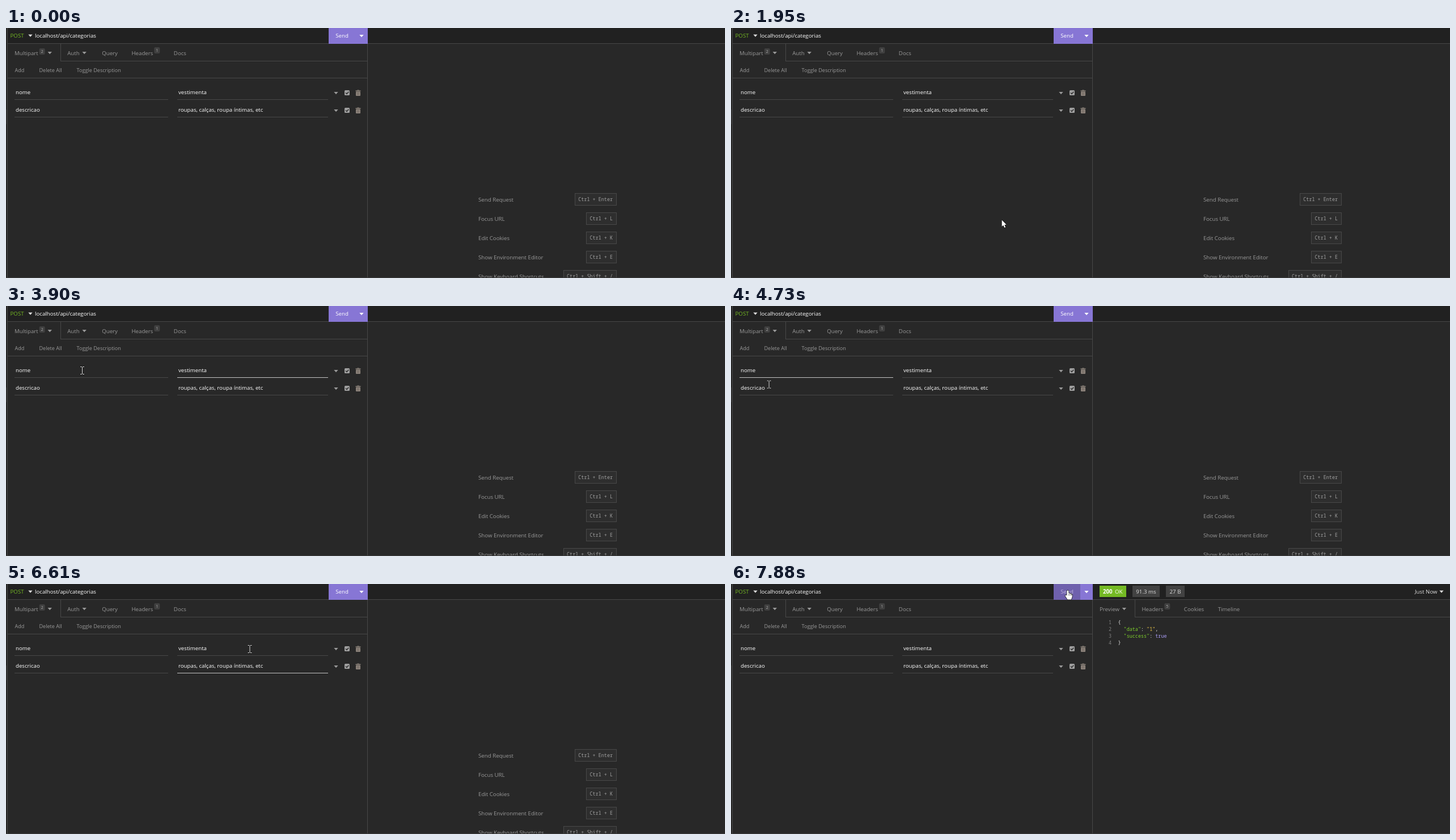
Recreate the animation shown at these times as an HTML page with a canvas. Size 1268x442 px, loop 8 s.

```html
<!DOCTYPE html>
<html lang="pt">
<head>
<meta charset="utf-8">
<title>API client</title>
<style>
html, body { margin: 0; width: 100%; height: 100%; overflow: hidden; background: #282828; }
canvas { display: block; }
</style>
</head>
<body>
<canvas id="stage" width="1268" height="442"></canvas>
<script>
const ctx = document.getElementById('stage').getContext('2d');
const LOOP = 8000, RESPONSE_AT = 7700, CLICK_DELAY = 150, BLINK = 500;
const SANS = '"Open Sans", "Noto Sans", sans-serif';
const MONO = '"Noto Sans Mono", "DejaVu Sans Mono", monospace';
const UI = `9.7px ${SANS}`, SMALL = `9.1px ${SANS}`, KEYS = `8.45px ${MONO}`, CODE = `500 ${KEYS}`;
const BG = '#282828', BAR = '#212121', LINE = '#484848', GREY = '#999', WHITE = '#fff';
const GREEN = '#75ba24', PURPLE = '#8776d5', PALE = '#ddd';

const ROW_TOP = 126, ROW_STEP = 31;
const COLUMNS = [{ x: 15, right: 286 }, { x: 302, right: 568 }];
const FIELDS = ['nome', 'vestimenta', 'descricao', 'roupas, calças, roupa íntimas, etc']
  .map((value, i) => ({ value, ...COLUMNS[i % 2], y: ROW_TOP + ROW_STEP * (i >> 1) }));

// The pointer glides from stop to stop; a stop may click a field, or Send.
const ENTRY = { x: 606, y: 432 };
const STOPS = [
  { leave: 290, arrive: 750, x: 466, y: 293 },
  { leave: 1040, arrive: 1200, x: 552, y: 234 },
  { leave: 1300, arrive: 1450, x: 658, y: 460 },
  { leave: 1450, arrive: 1600, x: 549, y: 450 },
  { leave: 1600, arrive: 2410, x: 371, y: 174 },
  { leave: 2450, arrive: 2780, x: 350, y: 110, click: 'vestimenta' },
  { leave: 3320, arrive: 3900, x: 134.5, y: 114 },
  { leave: 3980, arrive: 4020, x: 47, y: 115, click: 'nome' },
  { leave: 4400, arrive: 4910, x: 75, y: 148, click: 'descricao' },
  { leave: 5060, arrive: 5550, x: 416, y: 147, click: FIELDS[3].value },
  { leave: 5890, arrive: 6530, x: 430, y: 115, click: 'vestimenta' },
  { leave: 6720, arrive: 7480, x: 594, y: 11, click: 'Send' }
];

const SHORTCUTS = {
  'Send Request': 'Ctrl + Enter',
  'Focus URL': 'Ctrl + L',
  'Edit Cookies': 'Ctrl + K',
  'Show Environment Editor': 'Ctrl + E',
  'Show Keyboard Shortcuts': 'Ctrl + Shift + /'
};

const JSON_LINES = ['{', '  "data": "1",', '  "success": true', '}'];

const smooth = k => k * k * (3 - 2 * k);

function rect(x, y, w, h, color) {
  ctx.fillStyle = color;
  ctx.fillRect(x, y, w, h);
}

function round(x, y, w, h, r, color) {
  ctx.fillStyle = color;
  ctx.beginPath();
  ctx.roundRect(x, y, w, h, r);
  ctx.fill();
}

// Draws text and returns its width.
function text(str, x, y, color = GREY, font = UI, align = 'left') {
  ctx.font = font;
  ctx.fillStyle = color;
  ctx.textAlign = align;
  ctx.fillText(str, x, y);
  return ctx.measureText(str).width;
}

function caretDown(x, y, color = GREY) {
  ctx.fillStyle = color;
  ctx.beginPath();
  ctx.moveTo(x - 3.7, y - 2);
  ctx.lineTo(x + 3.7, y - 2);
  ctx.lineTo(x, y + 2.2);
  ctx.fill();
}

// Lays tabs out from left to right, with a divider after the first.
function drawTabs(x, right, tabs) {
  tabs.forEach(({ label, count, menu }, i) => {
    x += text(label, x, 47.5);
    if (count) {
      const y = menu ? 36 : 34;
      round(x + 2, y, 10, 11, 2, '#404040');
      text(count, x + 7, y + 8.3, '#aaa', `7px ${SANS}`, 'center');
      x += 12;
    }
    if (menu) {
      caretDown(x + 8.5, 44);
      x += 15;
    }
    x += 24.5;
    if (i === 0) {
      const edge = Math.round(x - 12.5);
      rect(edge, 28, 1, 31, LINE);
      rect(edge, 58, right - edge, 1, LINE);
    }
  });
}

function rowIcons(y) {
  caretDown(582, y);
  round(597, y - 5, 9, 9, 1.5, '#a0a0a0');
  ctx.strokeStyle = BG;
  ctx.lineWidth = 1.3;
  ctx.beginPath();
  ctx.moveTo(599, y - 0.5);
  ctx.lineTo(601, y + 1.5);
  ctx.lineTo(604.3, y - 2.3);
  ctx.stroke();
  const tan = '#91877f';
  rect(616.5, y - 4.5, 9, 1.4, tan);
  rect(619.3, y - 5.5, 3.4, 1, tan);
  round(617, y - 2.5, 8, 7.5, 1, tan);
  for (let i = 0; i < 3; i++) rect(618.8 + i * 1.9, y - 1.2, 0.6, 5, '#5c5651');
}

function drawFields(t) {
  const last = STOPS.filter(s => s.click && t >= s.arrive + CLICK_DELAY).pop();
  for (const { value, x, right, y } of FIELDS) {
    const active = last && last.click === value;
    rect(x, y, right - x, 1, active ? '#c4c4c4' : LINE);
    const width = text(value, x + 2, y - 9, WHITE);
    const lit = active && (t - last.arrive - CLICK_DELAY) % (2 * BLINK) < BLINK;
    if (lit) rect(Math.round(x + 2 + width), y - 19, 1, 13, WHITE);
  }
  for (let row = 0; row < 2; row++) rowIcons(ROW_TOP - 11 + row * ROW_STEP);
}

function drawRequest(t, hover) {
  text('POST', 7.5, 17, GREEN);
  caretDown(43, 13.5, PALE);
  text('localhost/api/categorias', 51, 16.6, WHITE);
  rect(569, 0, 69, 28, PURPLE);
  if (hover) rect(569, 0, 47, 28, '#6f61ad');
  text('Send', 592.5, 17.3, hover ? '#bdb5dc' : WHITE, UI, 'center');
  caretDown(627, 14, WHITE);

  drawTabs(15, 637, [
    { label: 'Multipart', count: '2', menu: true }, { label: 'Auth', menu: true },
    { label: 'Query' }, { label: 'Headers', count: '1' }, { label: 'Docs' }
  ]);
  let x = 15.5;
  for (const label of ['Add', 'Delete All', 'Toggle Description']) {
    x += text(label, x, 77.5, GREY, SMALL) + 26;
  }
  rect(2, 88, 635, 1, LINE);
  drawFields(t);
}

function drawShortcuts() {
  Object.entries(SHORTCUTS).forEach(([label, keys], i) => {
    const y = 292 + i * 34;
    text(label, 833, y + 15);
    ctx.font = KEYS;
    const w = Math.round(ctx.measureText(keys).width + 13.5);
    rect(1077 - w, y, w, 22, LINE);
    rect(1078 - w, y + 1, w - 2, 20, '#2e2e2e');
    text(keys, 1070, y + 14, '#a0a0a0', KEYS, 'right');
  });
}

function tag(label, x, w) {
  rect(x, 3, w, 20, '#424242');
  text(label, x + w / 2, 17, PALE, UI, 'center');
}

function tokenColor(token) {
  if (/^\s+"/.test(token)) return '#7ecf2b';
  if (token === '"1"') return '#f0c94a';
  return token === 'true' ? '#a99cf5' : '#eee';
}

function drawResponse() {
  rect(650, 3, 47, 20, GREEN);
  text('200', 656, 17, WHITE, `bold ${UI}`);
  text('OK', 677, 17, WHITE);
  tag('91.3 ms', 708, 48);
  tag('27 B', 767, 33);
  text('Just Now', 1206, 16.8, PALE);
  caretDown(1253, 13.5, PALE);
  drawTabs(650, 1268, [
    { label: 'Preview', menu: true }, { label: 'Headers', count: '5' },
    { label: 'Cookies' }, { label: 'Timeline' }
  ]);
  JSON_LINES.forEach((line, i) => {
    const y = 70.5 + i * 12.2;
    text(String(i + 1), 671, y, '#808080', KEYS, 'right');
    let x = 682.5;
    for (const token of line.match(/\s*"\w+"|true|[^"\w]+/g)) {
      const trimmed = x > 690 ? token.trimStart() : token;
      x += text(token, x, y, tokenColor(trimmed), CODE);
    }
  });
}

function pointerAt(t) {
  const i = STOPS.findLastIndex(s => t >= s.leave);
  if (i < 0) return null;
  const from = STOPS[i - 1] || ENTRY, to = STOPS[i];
  const k = smooth(Math.min(1, (t - to.leave) / (to.arrive - to.leave)));
  return { x: from.x + (to.x - from.x) * k, y: from.y + (to.y - from.y) * k };
}

const overField = ({ x, y }) => FIELDS.some(f => x >= f.x && x <= f.right && y > f.y - 24 && y <= f.y);
const overSend = ({ x, y }) => x >= 569 && x < 617 && y < 28;

function pointerShape(path, width) {
  const shape = new Path2D(path);
  ctx.strokeStyle = '#111';
  ctx.lineWidth = width;
  ctx.lineJoin = 'round';
  ctx.stroke(shape);
  ctx.fillStyle = WHITE;
  ctx.fill(shape);
}

function drawArrow() {
  pointerShape('M0 0V11.5L2.6 9.2L4.6 13.6L6.5 12.7L4.6 8.5L8 8.3Z', 1.2);
}

function drawBeam() {
  for (const [color, grow] of [['#151515', 0.6], ['#e8e8e8', 0]]) {
    const bar = (x, y, w, h) => rect(x - grow, y - grow, w + 2 * grow, h + 2 * grow, color);
    bar(-0.5, -6, 1, 12);
    for (const y of [-7, 6]) {
      bar(-3.5, y, 2.8, 1);
      bar(0.7, y, 2.8, 1);
    }
  }
}

function drawHand() {
  pointerShape('M-1.6 9.5V1.5Q0 -1 1.4 1.5V5.6Q3 4.8 3.9 6.2Q5.4 5.6 6 7Q7.8 6.8 7.8 8.8' +
    'L7.6 12L6 16.4H-.4L-4.4 10.6Q-4.8 8.2 -2.9 8.6Z', 1.4);
  for (let i = 0; i < 3; i++) rect(1.5 + i * 2.25, 6.5, 0.7, 3, '#333');
}

function drawPointer(p) {
  ctx.save();
  ctx.translate(p.x, p.y);
  if (overSend(p)) drawHand();
  else if (overField(p)) drawBeam();
  else drawArrow();
  ctx.restore();
}

function draw(t) {
  const pointer = pointerAt(t);
  rect(0, 0, 1268, 442, BG);
  rect(0, 0, 1268, 27, BAR);
  rect(0, 27, 1268, 1, LINE);
  rect(0, 0, 2, 442, '#252525');
  rect(0, 144, 1, 26, '#383838');
  rect(2, 0, 1, 442, LINE);
  rect(637, 0, 1, 442, LINE);
  drawRequest(t, pointer && overSend(pointer));
  if (t < RESPONSE_AT) drawShortcuts();
  else drawResponse();
  rect(0, 441, 1268, 1, '#3a3a3a');
  if (pointer) drawPointer(pointer);
}

function tick() {
  draw(performance.now() % LOOP);
  requestAnimationFrame(tick);
}
tick();
</script>
</body>
</html>
```
